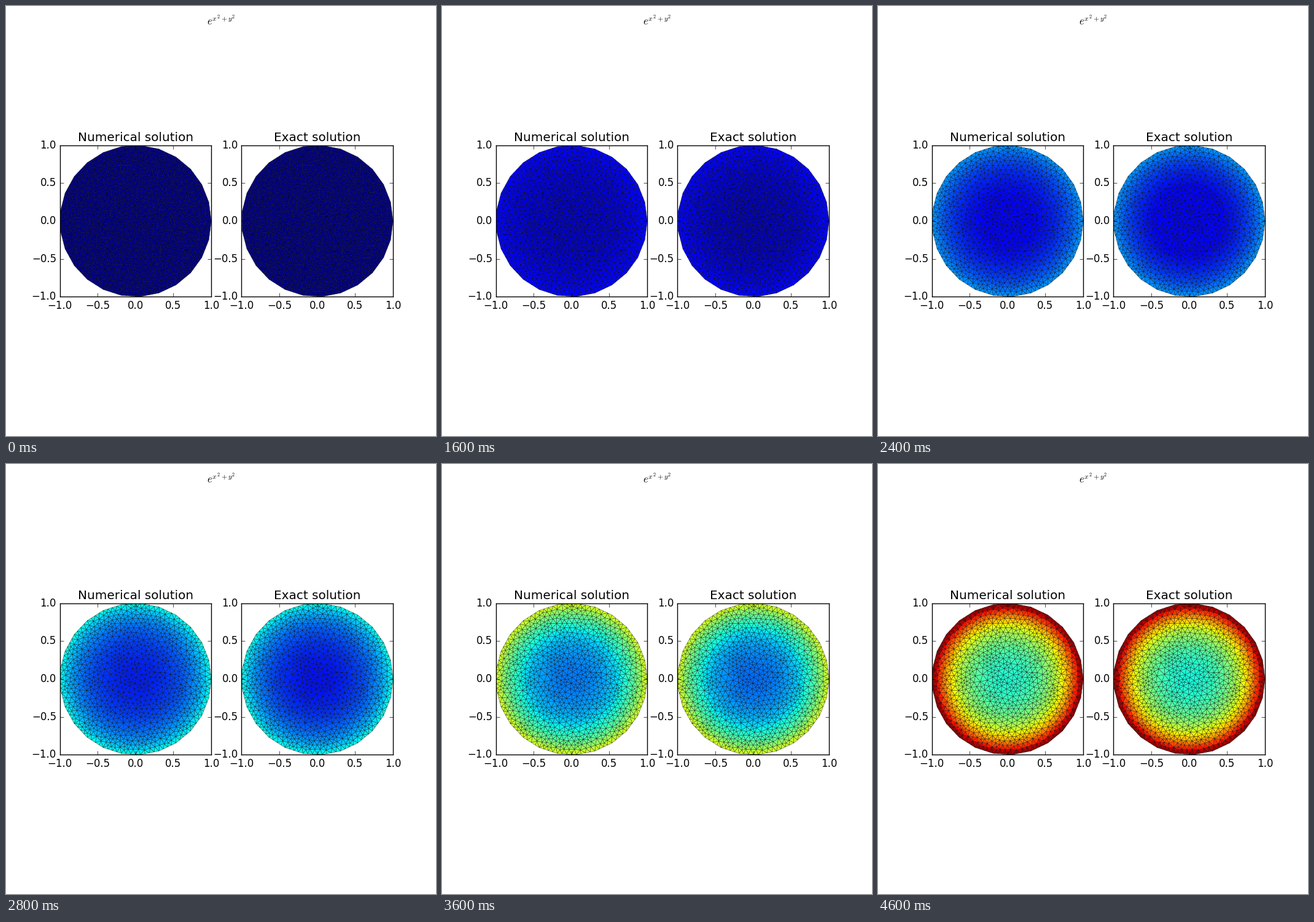
Write a matplotlib script that moves like this. It is 700 px wide and 700 px high and loops after 4.8 s.

```python
import numpy as np
import matplotlib.pyplot as plt
from matplotlib.animation import FuncAnimation
from matplotlib.tri import Triangulation

plt.style.use("classic")
plt.rcParams["savefig.dpi"] = "figure"

FRAMES = 24
INTERVAL = 200
SIDES = 25
SPLIT = 4          # mesh edges along each polygon side
INNER = 820        # free mesh vertices
rng = np.random.default_rng(7)


def polygon_rim():
    angle = 2 * np.pi * np.arange(SIDES) / SIDES
    corner = np.column_stack([np.cos(angle), np.sin(angle)])
    after = np.roll(corner, -1, axis=0)
    return np.vstack([corner + (after - corner) * k / SPLIT for k in range(SPLIT)])


def delaunay(pts):
    """Triangulate, leaving out flat triangles along the straight sides."""
    tri = Triangulation(*pts.T).triangles
    a, b, c = pts[tri].transpose(1, 2, 0)
    area = (b[0] - a[0]) * (c[1] - a[1]) - (b[1] - a[1]) * (c[0] - a[0])
    return Triangulation(*pts.T, triangles=tri[np.abs(area) > 1e-8])


def disc_mesh():
    """Evenly spread random vertices, smoothed into a Delaunay mesh."""
    rim = polygon_rim()
    pts = rim
    for _ in range(INNER):
        r = 0.97 * np.sqrt(rng.random(30))
        a = 2 * np.pi * rng.random(30)
        cand = np.column_stack([r * np.cos(a), r * np.sin(a)])
        gap = ((cand[:, None] - pts[None]) ** 2).sum(axis=2).min(axis=1)
        pts = np.vstack([pts, cand[gap.argmax()]])

    fixed = len(rim)
    for _ in range(6):
        i, j = delaunay(pts).edges.T
        total = np.zeros_like(pts)
        np.add.at(total, i, pts[j])
        np.add.at(total, j, pts[i])
        degree = np.bincount(np.r_[i, j], minlength=len(pts))
        mean = total / degree[:, None]
        pts[fixed:] = mean[fixed:]
    return delaunay(pts)


mesh = disc_mesh()
r2 = mesh.x ** 2 + mesh.y ** 2


def per_face(values):
    return values[mesh.triangles].mean(axis=1)


shape = per_face(np.exp(r2))
drift = per_face(0.035 * (1 - r2))   # small lead of the time stepping scheme

fig = plt.figure(figsize=(7, 7), dpi=100, facecolor="white")
fig.suptitle(r"$e^{x^2 + y^2}$")


def panel(pos, title):
    ax = fig.add_subplot(1, 2, pos, aspect="equal")
    ax.set_title(title)
    faces = ax.tripcolor(mesh, facecolors=np.zeros_like(shape), cmap="jet",
                         vmin=0, vmax=shape.max(), edgecolors="k")
    ax.set(xlim=(-1, 1), ylim=(-1, 1),
           xticks=np.linspace(-1, 1, 5), yticks=np.linspace(-1, 1, 5))
    return faces


numerical = panel(1, "Numerical solution")
exact = panel(2, "Exact solution")


def update(i):
    t = i / (FRAMES - 1)
    exact.set_array(t ** 2 * shape)
    numerical.set_array(t ** 2 * shape + min(1, 4 * t) * drift)
    return numerical, exact


anim = FuncAnimation(fig, update, frames=FRAMES, interval=INTERVAL,
                     repeat=True, repeat_delay=0)
plt.show()
```
